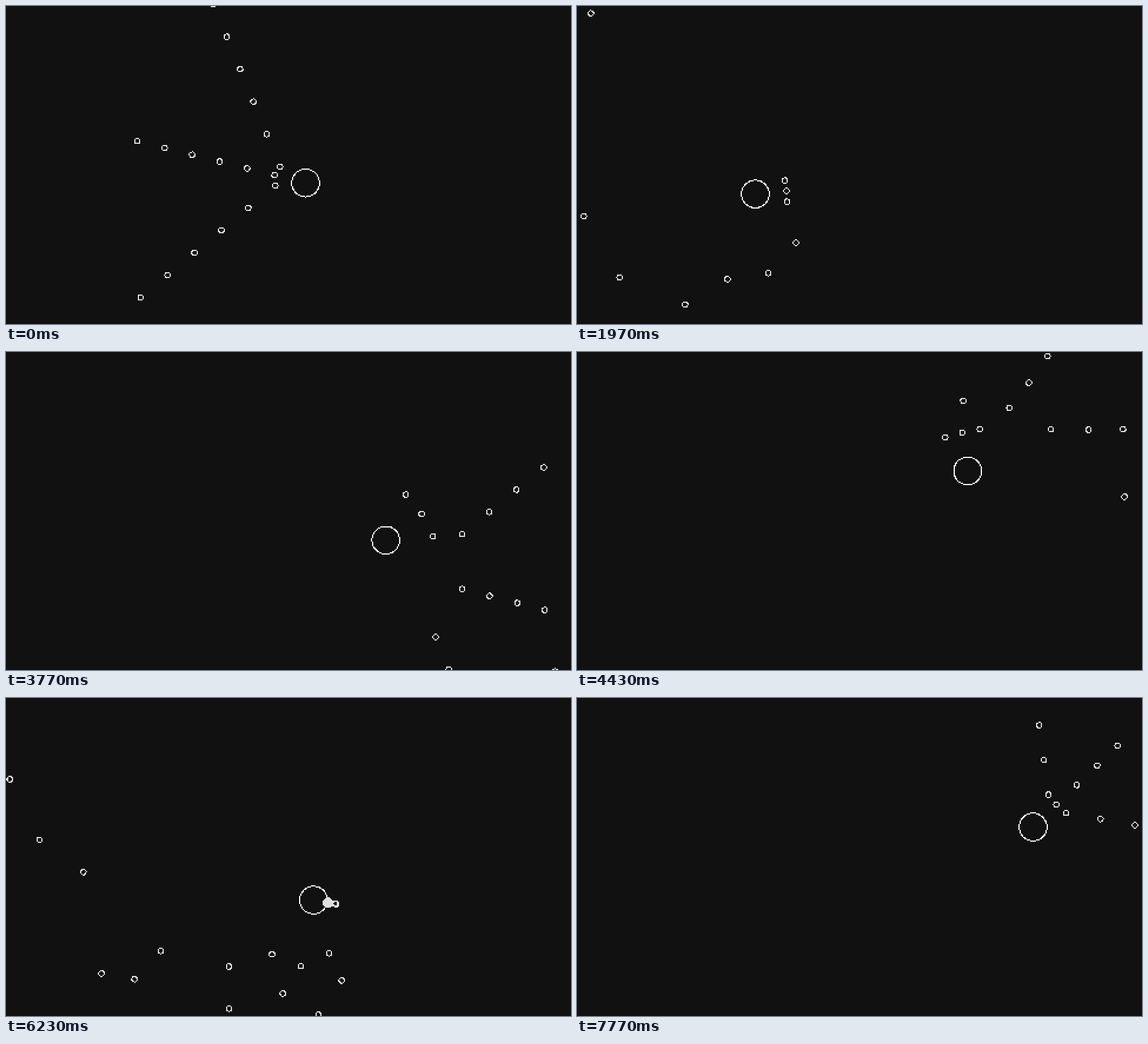
An HTML page with a canvas that plays this animation: 960 px wide and 540 px high, repeating every 7810 ms.

```html
<!DOCTYPE html>
<html lang="en">
<head>
<meta charset="utf-8">
<title>Triple shot</title>
<style>
  html, body { margin: 0; width: 100%; height: 100%; overflow: hidden; background: #111; }
  canvas { display: block; width: 960px; height: 540px; image-rendering: pixelated; }
</style>
</head>
<body>
<canvas id="stage" width="480" height="270"></canvas>
<script>
const ctx = document.getElementById('stage').getContext('2d');
const LOOP = 7810, FRAME = 100 / 3;
const SPEED = 48;          // ship travel per shot interval; bullets fly twice as fast
const SPREAD = Math.PI / 6;
const MUZZLE = 37.3;

// [ms, shots fired so far]
const pace = [[0, .344], [1100, 4.86], [2833, 11.89], [3767, 15.88],
  [5133, 21.52], [6233, 26.01], [7767, 32.45]];

// [shot clock, x, y, heading in degrees]
const path = [
  [-5, 757.5, 362.5, 194], [5, 292.5, 246.5, 194], [6, 249, 257.6, 131],
  [7, 244, 301.5, 62], [8, 285, 321, -5.5], [10, 380.5, 312, -5.5],
  [11, 426, 312.5, 14.4], [14, 564.5, 348.5, 14.4], [15, 607, 339.5, -33],
  [16, 650, 316, -40], [17, 676, 275.5, -72], [18, 676, 229, -103],
  [19, 653, 188, -130], [20, 616.5, 157, -150], [21, 571, 159.5, -189],
  [21.52, 548, 165, -205], [22, 532, 189, -222.6], [23, 503, 221, -248],
  [24, 499, 269, -263], [25, 498.5, 317, -271], [26, 522, 343, -350],
  [28, 616.6, 359.7, -350], [29, 655.4, 333.6, -403.8], [33, 794, 200.8, -403.8]
];

const rad = deg => deg * Math.PI / 180;
const mix = (a, b, f) => a + (b - a) * f;

// The pair of keys around v, and how far v lies between them
function span(keys, v) {
  let i = 0;
  while (i < keys.length - 2 && v >= keys[i + 1][0]) i++;
  const a = keys[i], b = keys[i + 1];
  const f = Math.min(1, Math.max(0, (v - a[0]) / (b[0] - a[0])));
  return [a, b, f];
}

function shotClock(ms) {
  const [a, b, f] = span(pace, ms);
  return mix(a[1], b[1], f);
}

function hermite(p, q, m, n, f) {
  const g = f * f, h = g * f;
  return (2 * h - 3 * g + 1) * p + (h - 2 * g + f) * m + (3 * g - 2 * h) * q + (h - g) * n;
}

function shipAt(clock) {
  const [a, b, f] = span(path, clock);
  const len = SPEED * (b[0] - a[0]), p = rad(a[3]), q = rad(b[3]);
  return {
    x: hermite(a[1], b[1], len * Math.cos(p), len * Math.cos(q), f),
    y: hermite(a[2], b[2], len * Math.sin(p), len * Math.sin(q), f),
    dir: mix(p, q, f)
  };
}

// Fill every coarse pixel near (x, y) whose offset passes the test
function plot(x, y, reach, color, test) {
  const cx = x / 2, cy = y / 2;
  ctx.fillStyle = color;
  for (let j = Math.floor(cy - reach); j <= cy + reach; j++)
    for (let i = Math.floor(cx - reach); i <= cx + reach; i++)
      if (test(i + .5 - cx, j + .5 - cy)) ctx.fillRect(i, j, 1, 1);
}

function ring(x, y, r, color) {
  plot(x, y, r + 1, color, (dx, dy) => Math.abs(Math.hypot(dx, dy) - r) < .5);
}

function flash(x, y) {
  plot(x, y, 6, '#e0e0e0', (dx, dy) =>
    Math.abs(dx) + Math.abs(dy) <= 6 && Math.max(Math.abs(dx), Math.abs(dy)) <= 4.8);
}

function volley(shot, clock) {
  const { x, y, dir } = shipAt(shot);
  const skew = 4 * Math.sin(dir) - 1.5 * Math.cos(dir);
  const flown = 2 * SPEED * (clock - shot);
  for (const side of [-1, 0, 1]) {
    const gap = MUZZLE + (side ? -skew : skew), aim = dir + side * SPREAD;
    ring(x + gap * Math.cos(dir) + flown * Math.cos(aim),
         y + gap * Math.sin(dir) + flown * Math.sin(aim), 2.3, '#e0e0e0');
  }
}

function draw(ms) {
  const step = Math.floor((ms + 5) / FRAME);
  const clock = shotClock(step * FRAME);
  const ship = shipAt(clock);
  const last = Math.floor(clock);

  ctx.fillStyle = '#111';
  ctx.fillRect(0, 0, 480, 270);
  ring(ship.x, ship.y, 11.75, '#fff');
  if (clock - last < .137)
    flash(ship.x + 24.5 * Math.cos(ship.dir), ship.y + 24.5 * Math.sin(ship.dir));
  for (let shot = Math.max(-5, last - 12); shot <= last; shot++) volley(shot, clock);
}

const start = performance.now();
function tick() {
  draw((performance.now() - start) % LOOP);
  requestAnimationFrame(tick);
}
tick();
</script>
</body>
</html>
```
